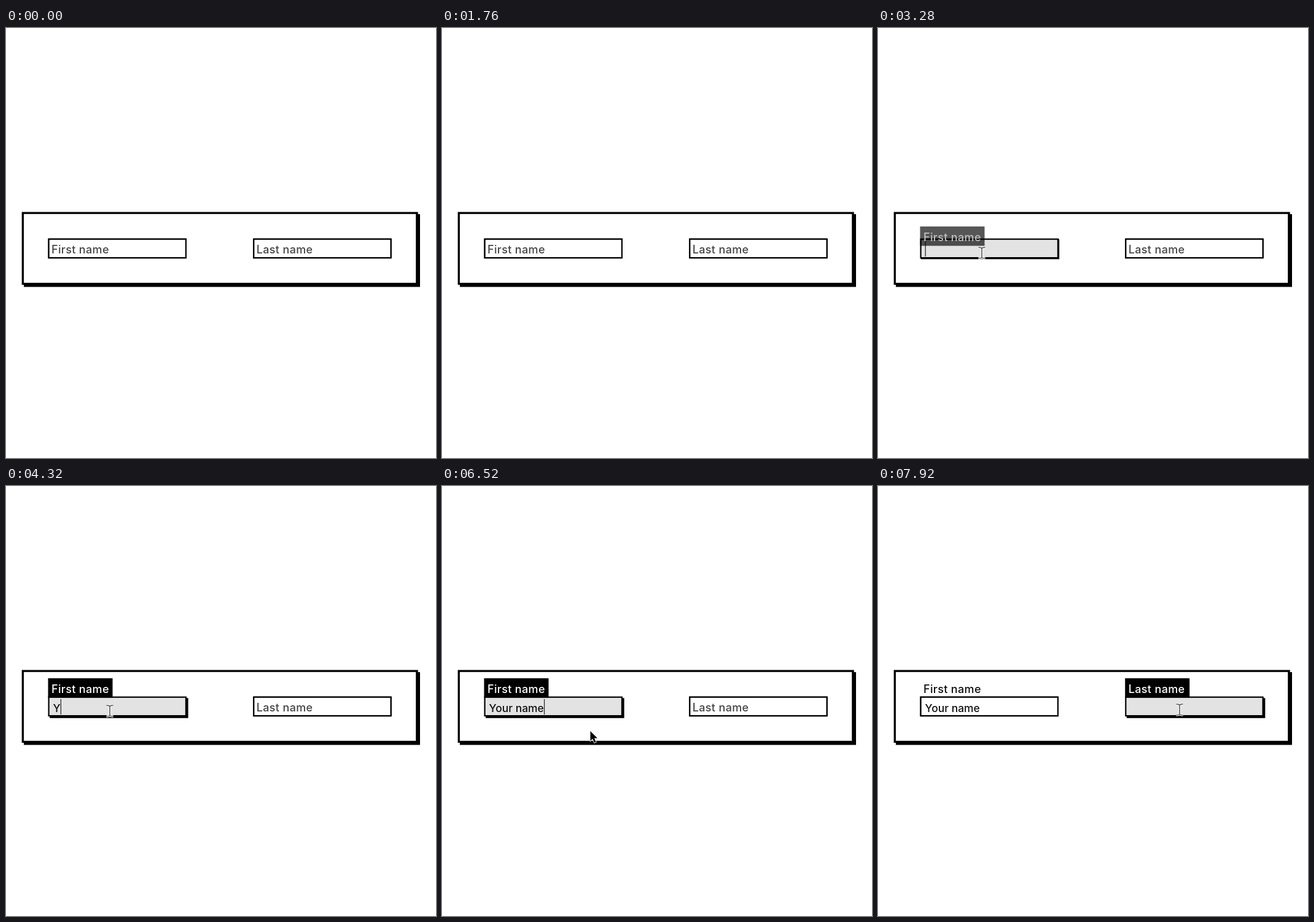
An HTML page that plays this animation: 700 px wide and 700 px high, repeating every 8000 ms.

```html
<!DOCTYPE html>
<html lang="en">
<head>
<meta charset="utf-8">
<title>Floating labels</title>
<style>
  html, body { margin: 0; width: 100%; height: 100%; overflow: hidden; background: #fff; }
  svg { display: block; width: 100vw; height: 100vh; }
  text { font-family: Inter, "Liberation Sans", sans-serif; font-weight: 550; white-space: pre; }
  .label { font-size: 18px; letter-spacing: .35px; }
  .value { font-size: 17.4px; letter-spacing: .05px; fill: #111; }
</style>
</head>
<body>
<svg id="stage" viewBox="0 0 700 700">
  <rect width="700" height="700" fill="#fff"/>
  <rect x="29" y="303" width="645" height="118.5"/>
  <rect x="25.7" y="299.5" width="645" height="118.5"/>
  <rect x="29" y="302.8" width="638.2" height="112" fill="#fff"/>
</svg>
<script>
const LOOP = 8000, RISE = 300, FADE = 100, BLINK = 500;
const FOCUS1 = 3165, FOCUS2 = 7035;
const FIELD = { y: 342.6, width: 225.5, height: 32.6 };
const NAME = 'Your name';
const KEYS = [4240, 4480, 4640, 4840, 5080, 5360, 5600, 5840, 6080];
// Pointer path: time, x, y
const PATH = [
  [2130, -14, 406], [2360, 32, 407], [2600, 96, 393], [2820, 150, 374], [3020, 169, 366],
  [6260, 169, 366], [6390, 192, 387], [6520, 241, 399], [6700, 346, 390],
  [6860, 444, 371], [7000, 491, 364]
];

const stage = document.getElementById('stage');
const clamp = v => Math.min(1, Math.max(0, v));

function set(node, attrs) {
  for (const key in attrs) node.setAttribute(key, attrs[key]);
  return node;
}

function add(tag, attrs, parent = stage) {
  return parent.appendChild(set(document.createElementNS('http://www.w3.org/2000/svg', tag), attrs));
}

// CSS "ease": cubic-bezier(.25, .1, .25, 1)
function ease(x) {
  if (x <= 0) return 0;
  if (x >= 1) return 1;
  let lo = 0, hi = 1, s;
  for (let i = 0; i < 20; i++) {
    s = (lo + hi) / 2;
    const bx = .75 * s * (1 - s) + s ** 3;
    if (bx < x) lo = s; else hi = s;
  }
  return .3 * s * (1 - s) ** 2 + 3 * s * s * (1 - s) + s ** 3;
}

function makeField(x, name) {
  const { y, width, height } = FIELD;
  return {
    x,
    shadow: add('rect', { x, y, width, height }),
    box: add('rect', {
      x: x + 1.1, y: y + 1.1, width: width - 2.2, height: height - 2.2,
      stroke: '#000', 'stroke-width': 2.2
    }),
    value: add('text', { x: x + 8, y: 367.5, class: 'value' }),
    caret: add('rect', { y: 347, width: 1.2, height: 25, fill: '#222' }),
    label: makeLabel(x, name)
  };
}

function makeLabel(x, name) {
  const group = add('g', {});
  const back = add('rect', { x, y: 343, width: 105, height: 31.5 }, group);
  const text = add('text', { x: x + 5.5, y: 366.5, class: 'label' }, group);
  text.textContent = name;
  return { group, back, text };
}

const first = makeField(68.5, 'First name');
const last = makeField(402.2, 'Last name');

const arrow = add('path', {
  d: 'M0 0V16L3.7 12.6L6.5 19L9.2 17.8L6.4 11.6H11.5Z',
  stroke: '#fff', 'stroke-width': 1.6, 'paint-order': 'stroke'
});
const beam = add('g', { fill: 'none' });
const beamShape = 'M-5.5 -9Q-1 -9 0 -7Q1 -9 5.5 -9M0 -7V7M-5.5 9Q-1 9 0 7Q1 9 5.5 9';
add('path', { d: beamShape, stroke: '#fff', 'stroke-width': 3.6 }, beam);
add('path', { d: beamShape, stroke: '#555', 'stroke-width': 1.6 }, beam);

const show = (node, on) => set(node, { visibility: on ? 'visible' : 'hidden' });

// rise lifts the label, glow is how strongly it is highlighted
function drawField(field, focused, rise, glow, restGray) {
  const { group, back, text } = field.label;
  const gray = Math.round(restGray + (255 - restGray) * glow);
  const depth = 2.6 * glow * glow;
  set(field.box, { fill: focused ? '#e3e3e3' : '#fff' });
  set(field.shadow, { transform: `translate(${depth} ${depth})` });
  set(group, { transform: `translate(0 ${-30 * rise})` });
  set(back, { 'fill-opacity': glow });
  set(text, { fill: `rgb(${gray},${gray},${gray})` });
}

function drawCaret(field, x, since, on) {
  show(field.caret, on && since % (2 * BLINK) < BLINK);
  set(field.caret, { x });
}

function slope(i, k) {
  const a = PATH[i - 1], b = PATH[i + 1];
  if (!a || !b || i === 4 || i === 5) return 0;
  return (b[k] - a[k]) / (b[0] - a[0]);
}

function pointerAt(t) {
  const end = PATH.length - 1;
  if (t >= PATH[end][0]) return PATH[end].slice(1);
  const i = Math.max(0, PATH.findIndex(p => p[0] > t) - 1);
  const a = PATH[i], b = PATH[i + 1], span = b[0] - a[0];
  const u = clamp((t - a[0]) / span), v = 1 - u;
  return [1, 2].map(k =>
    a[k] * (1 + 2 * u) * v * v + b[k] * u * u * (3 - 2 * u) +
    span * u * v * (slope(i, k) * v - slope(i + 1, k) * u));
}

function drawPointer(t) {
  const [x, y] = pointerAt(t);
  const inside = y > FIELD.y && y < FIELD.y + FIELD.height &&
    [first, last].some(f => x > f.x && x < f.x + FIELD.width);
  const here = t >= PATH[0][0];
  show(beam, here && inside);
  show(arrow, here && !inside);
  set(inside ? beam : arrow, { transform: `translate(${x} ${y})` });
}

function draw(t) {
  const rise1 = ease((t - FOCUS1) / RISE);
  const rise2 = ease((t - FOCUS2) / RISE);
  const left = 1 - ease((t - FOCUS2) / FADE);
  const in1 = t >= FOCUS1 && t < FOCUS2;
  const in2 = t >= FOCUS2;

  drawField(first, in1, rise1, rise1 * left, in2 ? 15 : 68);
  drawField(last, in2, rise2, rise2, 68);

  const count = KEYS.filter(k => k <= t).length;
  first.value.textContent = NAME.slice(0, count);
  const width = count ? first.value.getComputedTextLength() : 0;
  drawCaret(first, 76.6 + width, t - (count ? KEYS[count - 1] : FOCUS1), in1);
  drawCaret(last, 410, t - FOCUS2, in2);
  drawPointer(t);
}

function tick() {
  draw(performance.now() % LOOP);
  requestAnimationFrame(tick);
}
tick();
</script>
</body>
</html>
```
